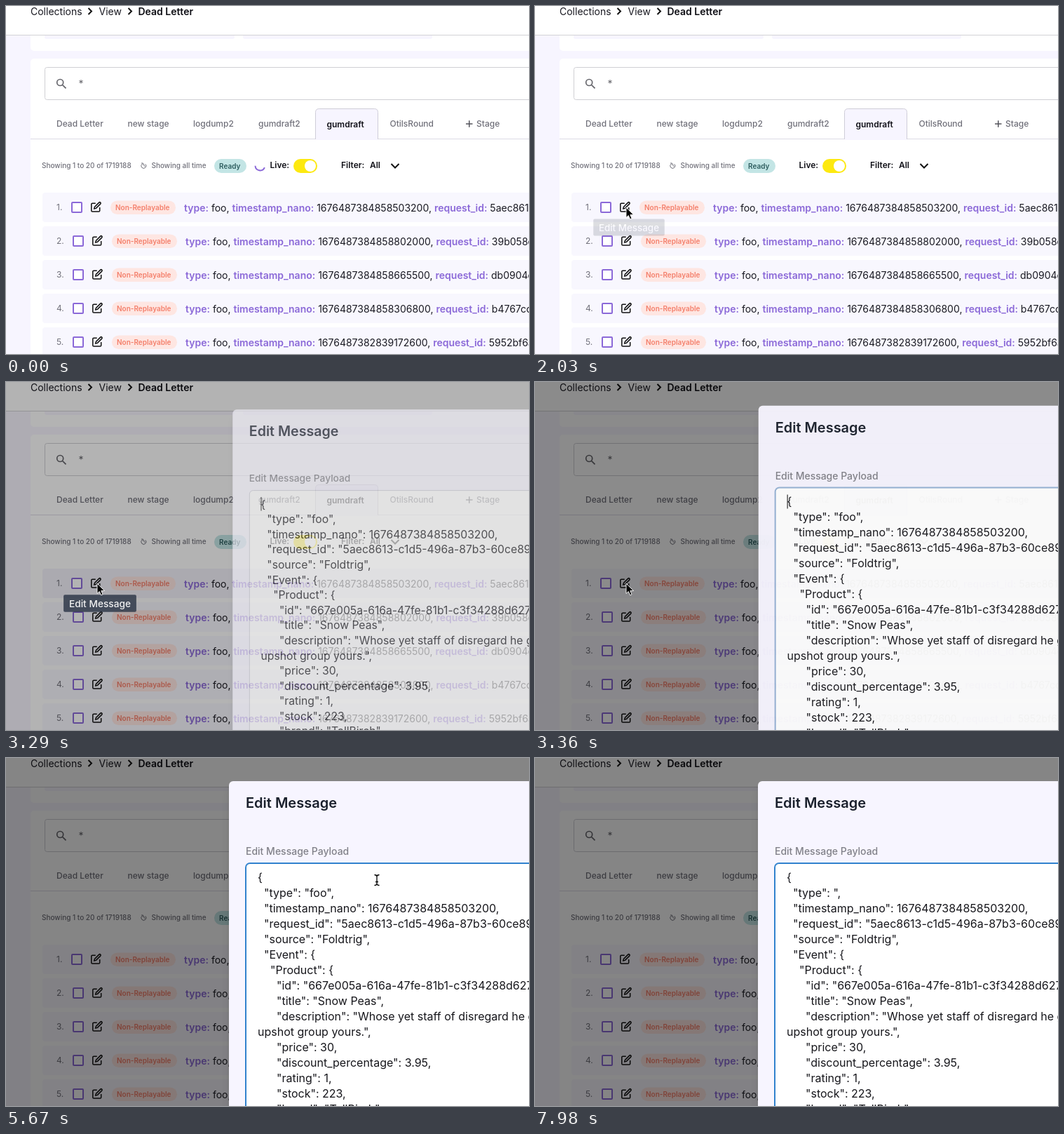
Write an HTML page that moves like this. It is 746 px wide and 496 px high and loops after 8000 ms.

```html
<!DOCTYPE html>
<html lang="en">
<head>
<meta charset="utf-8">
<title>Edit message</title>
<style>
  html, body { margin: 0; width: 100%; height: 100%; overflow: hidden; background: #fff; }
  #stage, svg, #shade { position: absolute; left: 0; top: 0; width: 746px; height: 496px; overflow: hidden; }
  #stage { font-family: Inter, sans-serif; }
  #shade { background: rgba(0, 0, 0, .48); }
  #modal {
    position: absolute; left: 318px; top: 33px; width: 564px; height: 674px;
    background: #f7f5ff; border-radius: 6px; color: #1a202c;
    box-shadow: 0 10px 15px -3px rgba(0, 0, 0, .1), 0 4px 6px -2px rgba(0, 0, 0, .05);
  }
  #modal > * { position: absolute; left: 24px; margin: 0; white-space: pre; }
  h1 { top: 16px; font: 600 20px/30px Inter, sans-serif; }
  label { top: 90px; font: 500 14px/20px Inter, sans-serif; color: #808088; }
  #field {
    box-sizing: border-box; top: 117px; width: 516px; height: 520px; padding: 8px 16px;
    border: 1px solid; border-radius: 6px; background: #fff; overflow: hidden;
    font: 400 16px/22px Inter, sans-serif; color: #17171c;
  }
  #field div { height: 22px; }
  #field i { position: absolute; width: 1px; height: 20px; margin-top: 1px; background: #000; }
</style>
</head>
<body>
<div id="stage">
  <svg id="page" viewBox="0 0 746 496"></svg>
  <div id="shade"></div>
  <div id="modal">
    <h1>Edit Message</h1>
    <label>Edit Message Payload</label>
    <div id="field"></div>
  </div>
  <svg id="top" viewBox="0 0 746 496"></svg>
</div>
<script>
const LOOP = 8000, TICK = 70;
const $ = id => document.getElementById(id);
const PURPLE = '#8b69d8', INK = '#1a1a22', BLACK = '#111118', GRAY = '#70707a', LILAC = '#f7f5ff';

const text = (x, y, size, weight, fill, s) =>
  `<text x="${x}" y="${y}" font-size="${size}" font-weight="${weight}" fill="${fill}">${s}</text>`;
const rect = (x, y, w, h, r, fill, more = '') =>
  `<rect x="${x}" y="${y}" width="${w}" height="${h}" rx="${r}" fill="${fill}" ${more}/>`;
const line = (d, stroke, w) =>
  `<path d="${d}" fill="none" stroke="${stroke}" stroke-width="${w}"/>`;

// Page

const records = [
  '1676487384858503200 5aec8613-c1d5',
  '1676487384858802000 39b058e2-a7f4',
  '1676487384858665500 db0904c7-52be',
  '1676487384858306800 b4767cc1-09da',
  '1676487382839172600 5952bf6a-e310'
];
const pencil = 'M11 4H4a2 2 0 0 0-2 2v14a2 2 0 0 0 2 2h14a2 2 0 0 0 2-2v-7' +
  'M18.5 2.5a2.1 2.1 0 0 1 3 3L12 15l-4 1 1-4z';

function row(record, i) {
  const [nano, id] = record.split(' ');
  const key = s => `<tspan font-weight="600" fill="${PURPLE}">${s}:</tspan>`;
  return `<g transform="translate(0 ${266 + i * 48})">` +
    rect(52, 0, 720, 42, 4, '#f8f7fe', i ? '' : 'id="first"') +
    text(72, 25, 12, 400, GRAY, i + 1 + '.') +
    `<g transform="translate(${i ? 2 : 0} 0)">` +
    rect(94, 14, 14, 14, 1, '#fff', `stroke="${PURPLE}" stroke-width="2"`) +
    `<g transform="translate(120.5 12.5) scale(.66)">${line(pencil, '#111', 2.3)}</g>` +
    rect(149, 11.5, 93, 19.5, 9.7, '#fee6e2') +
    text(156, 25, 10, 600, '#f47f6b', 'Non-Replayable') +
    text(254, 27, 14, 400, INK,
      `${key('type')} foo, ${key('timestamp_nano')} ${nano}, ${key('request_id')} ${id}`) +
    '</g></g>';
}

const header = rect(0, 0, 746, 41, 0, '#fff') + rect(0, 41, 746, 1, 0, '#d2d2d6') +
  text(35, 13.3, 14, 400, INK, 'Collections') +
  text(132.5, 13.3, 14, 400, INK, 'View') +
  text(188.5, 13.3, 14, 600, '#0e0e14', 'Dead Letter') +
  [117.5, 174.5].map(x => line(`M${x} 3l4.5 4.5-4.5 4.5`, '#111', 2)).join('');

const cards = rect(35, 20, 740, 44, 5, '#fff') +
  rect(55, 20, 271, 27, 3, LILAC) + rect(338, 20, 270, 27, 3, LILAC) +
  rect(35, 75, 740, 440, 5, '#fff');

const search = rect(55.5, 87.5, 720, 46, 3, '#fff', 'stroke="#cfcfd4"') +
  line('M81.7 109a4.5 4.5 0 1 0-9 0a4.5 4.5 0 1 0 9 0M80.5 112.3l5 5', '#66666c', 1.7) +
  text(103.5, 116, 14, 400, '#66666c', '*');

const tab = (x, s) => text(x, 172, 12, 500, GRAY, s);
const tabs = line('M35 189.5H746', '#dcdae6', 1) +
  `<path d="M441.5 190V151.5q0-5 5-5h79q5 0 5 5V190" fill="${LILAC}" stroke="#cfcdd8"/>` +
  rect(442, 189, 88, 2, 0, LILAC) +
  tab(72, 'Dead Letter') + tab(173.5, 'new stage') + tab(267, 'logdump2') +
  tab(360, 'gumdraft2') + tab(547.5, 'OtilsRound') + tab(671, 'Stage') +
  text(457.5, 173, 12, 600, BLACK, 'gumdraft') +
  line('M656 168h9.5M660.75 163.25v9.5', '#55555d', 1.5);

const status = text(51, 231, 10, 500, GRAY, 'Showing 1 to 20 of 1719188') +
  line('M194 225.2a3.5 3.5 0 1 0 5 .3M193 224h2.5v2.5M197 225.5v2.2l1.5 1', GRAY, 1) +
  text(207.5, 231, 10, 500, GRAY, 'Showing all time') +
  rect(297, 218, 46, 20, 10, '#c3e5e5') + text(304, 232, 10, 600, '#2d5c5e', 'Ready') +
  `<g id="spin">${line('M368.9 230.2A7 7 0 0 1 355.5 227.8', PURPLE, 2)}</g>` +
  text(376.5, 231, 12, 600, BLACK, 'Live:') +
  rect(410, 218, 34, 20, 10, '#fde910') + rect(426, 220, 16, 16, 8, '#fff') +
  text(478, 231, 12, 600, BLACK, 'Filter:') + text(519, 231, 12, 600, BLACK, 'All') +
  line('M549.5 225l5.5 5.5 5.5-5.5', '#111', 2);

$('page').innerHTML = rect(0, 0, 746, 496, 0, LILAC) + cards + header + search + tabs + status +
  records.map(row).join('');

// Tooltip and pointer

const beam = 'M-3.5-7.5q3 0 3.5 2q.5-2 3.5-2M0-6V6M-3.5 7.5q3 0 3.5-2q.5 2 3.5 2M-2 2.5h4';
$('top').innerHTML =
  `<g id="tip">${rect(81, 303, 106, 25, 2, '#2d3748')}${text(89, 321, 14, 500, '#fff', 'Edit Message')}</g>` +
  '<g id="cursor">' +
  '<path d="M0 0v14.5l3.3-3 2.3 5.3 2.4-1-2.2-5.2h4.7z" stroke="#fff" stroke-width=".9"/>' +
  '<path d="M3 1.5c0-2 2.500-2 2.500 0v5c.5-1 2.300-.8 2.300.5.600-.9 2.200-.5 2.200.8.8-.6 2 0 2 1.200v3.500c0 2-1.200 3-1.500 4.500h-6c-.5-2-2.300-3.500-4.300-6.500-.8-1.300.8-2 1.700-1.200l1.100 1.200z" fill="#fff" stroke="#000"/>'.replace(/00\b/g, '') +
  `<g>${line(beam, '#fff', 3)}${line(beam, '#000', 1.3)}</g>` +
  '</g>';

// Payload

const payload = `{
  "type": "foo",
  "timestamp_nano": 1676487384858503200,
  "request_id": "5aec8613-c1d5-496a-87b3-60ce89f1",
  "source": "Foldtrig",
  "Event": {
    "Product": {
      "id": "667e005a-616a-47fe-81b1-c3f34288d627",
      "title": "Snow Peas",
      "description": "Whose yet staff of disregard he gave
upshot group yours.",
      "price": 30,
      "discount_percentage": 3.95,
      "rating": 1,
      "stock": 223,
      "brand": "TallBirch",`;
$('field').innerHTML = payload.split('\n').map(s => `<div>${s}</div>`).join('');
const [brace, typed] = $('field').children;

// Timing

const OPEN = 3290, CLICK = 4830, RELEASE = 5160, ARROW_KEY = 6370, BLINK = 500;
const deletes = [6930, 7070, 7210, 7420];
const resets = [OPEN, CLICK, RELEASE, ARROW_KEY, 7480];

// pointer moves: start, end, x, y
const moves = [
  [70, 700, 64, 289], [770, 1050, 98, 291], [1120, 1330, 108, 290], [1400, 1540, 130, 287],
  [3570, 4030, 443, 202], [4270, 4410, 451, 198], [4690, 4900, 457, 193],
  [4970, 5110, 446, 201], [5110, 5390, 529, 174]
];

const clamp = v => Math.min(1, Math.max(0, v));
const span = (t, a, b) => clamp((t - a) / (b - a));
const smooth = v => v * v * (3 - 2 * v);
const mix = (a, b, k) => `rgb(${a.map((v, i) => Math.round(v + (b[i] - v) * k))})`;

function pointAt(t) {
  let x = 690, y = 476;
  for (const [a, b, toX, toY] of moves) {
    const k = smooth(span(t, a, b));
    x += (toX - x) * k;
    y += (toY - y) * k;
  }
  return [x, y];
}

function pointerShape(t, x) {
  if (t <= TICK || t >= 6300) return -1;
  if (t >= OPEN) return x > 342 ? 2 : 0;
  return t >= 2100 ? 1 : 0;
}

let shown = '';
function setTyping(t) {
  const reset = resets.filter(r => r <= t).pop();
  const lit = reset !== undefined && Math.floor((t - reset) / BLINK) % 2 === 0;
  const at = t < ARROW_KEY ? 4 : 5 - deletes.filter(d => d <= t).length;
  const caret = lit ? '<i></i>' : '';
  const rest = t < ARROW_KEY ? '",' : ',';
  const first = (t < CLICK ? caret : '') + '{';
  const second = '  "type": ' + '"foo"'.slice(0, at) + (t < CLICK ? '' : caret) + rest;
  if (shown === first + second) return;
  shown = first + second;
  brace.innerHTML = first;
  typed.innerHTML = second;
}

function draw(now) {
  const t = Math.floor(now % LOOP / TICK) * TICK;

  $('spin').style.display = t < 560 ? '' : 'none';
  $('spin').setAttribute('transform', `rotate(${t / 450 * 360} 362.5 227.5)`);

  const open = t < OPEN ? 0 : 1 - (1 - span(t, OPEN - 56, OPEN + 144)) ** 3;
  const hover = span(t, 2030, 2240) * (1 - open);
  $('first').setAttribute('fill', mix([248, 247, 254], [235, 233, 242], hover));

  const enter = smooth(span(t, 1980, 2180));
  const leave = t < OPEN ? 0 : span(t, OPEN - 50, OPEN + 70);
  const size = .95 + .05 * (enter - leave);
  $('tip').setAttribute('opacity', enter * (1 - leave * leave));
  $('tip').setAttribute('transform', `translate(134 315.5) scale(${size}) translate(-134 -315.5)`);

  $('shade').style.opacity = $('modal').style.opacity = open;
  $('modal').style.transform = open < 1 ? `scale(${.95 + .05 * open})` : 'none';
  const focus = span(t, OPEN, OPEN + 200), edge = mix([205, 205, 216], [49, 130, 206], focus);
  $('field').style.borderColor = edge;
  $('field').style.boxShadow = focus ? `0 0 0 1px ${edge}` : 'none';
  setTyping(t);

  const [x, y] = pointAt(t), shape = pointerShape(t, x);
  $('cursor').setAttribute('transform', `translate(${x} ${y})`);
  [...$('cursor').children].forEach((el, i) => el.style.display = i === shape ? '' : 'none');
}

const start = performance.now();
function frame() {
  draw(performance.now() - start);
  requestAnimationFrame(frame);
}
frame();
</script>
</body>
</html>
```
